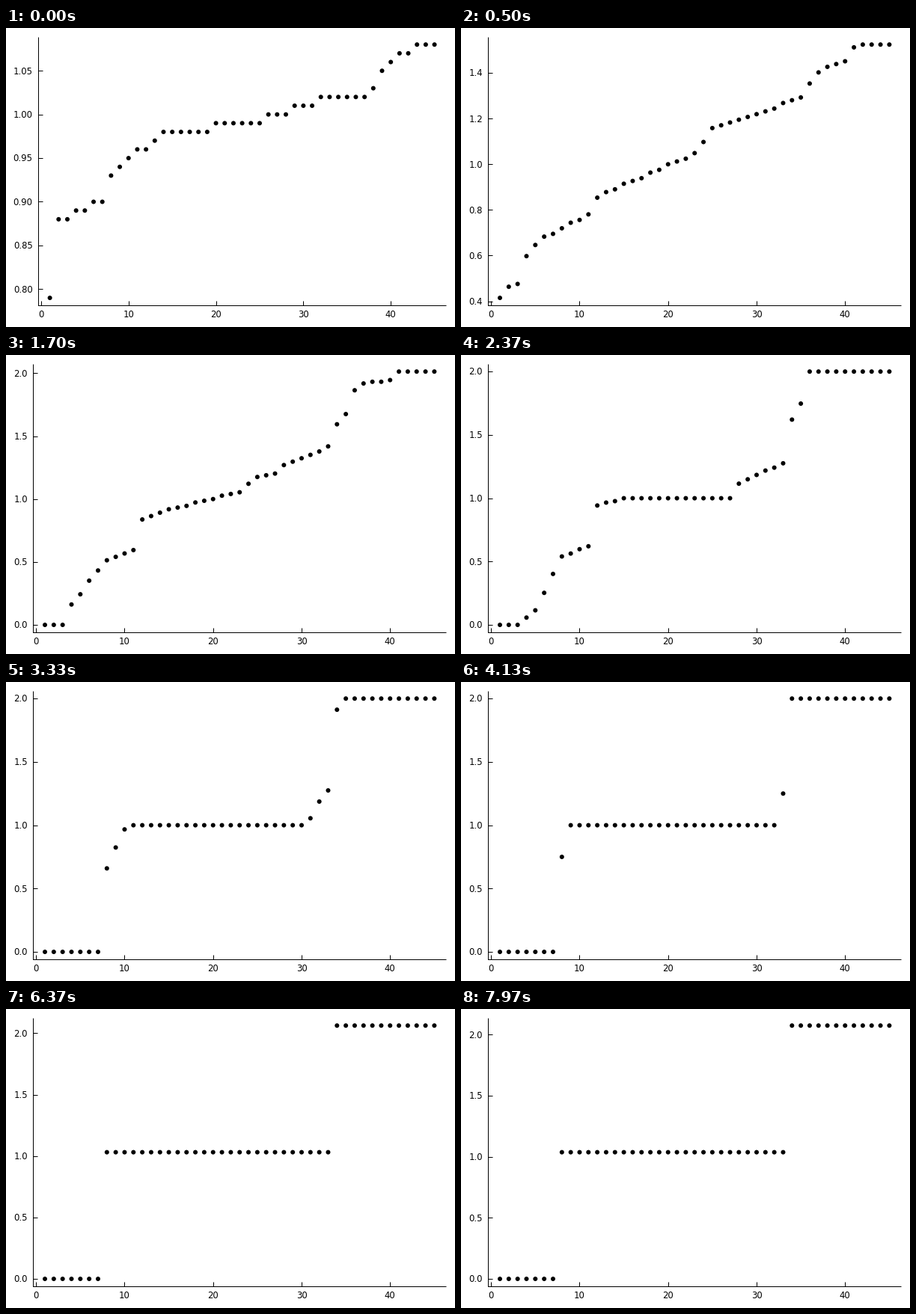
These frames come from a looping animation (600x400 px, 8 s). A matplotlib script:

```python
import numpy as np
import matplotlib.pyplot as plt
from matplotlib.animation import FuncAnimation

W, H, DPI = 600, 400, 100
FRAMES, FPS = 240, 30
N = 45
RIGHT, TOP, BOTTOM = 588, 12, 371.2
PAD = 0.03 / 1.06          # share of the axis left free at each end
PX = 72 / DPI
SPREAD_AT, LOCK_AT = 32, 71

rank = np.arange(1, N + 1)


def curve(*points):
    """Piecewise linear curve over the ranks through (rank, ratio) points."""
    return np.interp(rank, *zip(*points))


# Sorted frequency ratios: uncoupled, spread out, and partly locked.
free = curve((1, .79), (2, .88), (7, .90), (8, .93), (14, .98), (25, .99),
             (26, 1), (34, 1.02), (37, 1.02), (40, 1.06), (43, 1.08))
spread = curve((3, 0), (4, .274), (6, .45), (8, .484), (11, .58), (12, .726),
               (23, 1.113), (25, 1.34), (30, 1.45), (35, 1.61), (37, 1.84),
               (40, 1.9), (41, 2.03))
partial = curve((3, 0), (5, .115), (8, .54), (11, .62), (12, .943), (15, 1),
                (27, 1), (28, 1.115), (33, 1.28), (34, 1.62), (35, 1.75),
                (36, 2))

# Each oscillator settles on 0, 1 or 2; those next to a step do so last.
EDGES = np.array([7.5, 33.5])
goal = np.searchsorted(EDGES, rank)
gap = np.abs(rank[:, None] - EDGES).min(axis=1)
lock_time = np.array([15, 64, 21])[goal] / gap ** 0.8
power = np.where(partial > goal, 3, 1)


def shape(k):
    if k < SPREAD_AT:
        return free + (spread - free) * k / SPREAD_AT
    if k < LOCK_AT:
        f = (k - SPREAD_AT) / (LOCK_AT - SPREAD_AT)
        return spread + (partial - spread) * f
    u = np.clip((k - LOCK_AT) / lock_time, 0, 1)
    return goal + (partial - goal) * (1 - u ** power)


def values(k):
    """Whole cycle counts divided by a whole reference count."""
    ref = np.interp(k, [0, 32, 71, 99, 147, 191, 239],
                    [100, 62, 87, 91, 109, 129, 161])
    drift = np.interp(k, [99, 147, 191, 239], [1, 1.009, 1.031, 1.0373])
    return np.round(shape(k) * np.round(ref * drift)) / np.round(ref)


def tick_step(span):
    for limit, step in ((0.36, 0.05), (0.72, 0.1), (1.44, 0.2)):
        if span < limit:
            return step
    return 0.5


def scale(lo, hi, a, b):
    """Map lo..hi onto pixels a..b with the padding kept free."""
    edge = (b - a) * PAD
    return lambda v: a + edge + (v - lo) / (hi - lo) * (b - a - 2 * edge)


fig = plt.figure(figsize=(W / DPI, H / DPI), dpi=DPI, facecolor="white")
ax = fig.add_axes([0, 0, 1, 1])
ax.set_xlim(0, W)
ax.set_ylim(H, 0)
ax.axis("off")

lines, = ax.plot([], [], color="black", lw=PX, solid_capstyle="butt")
dots = ax.scatter(rank, rank, s=np.full(N, (6 * PX) ** 2), color="black",
                  linewidths=0)
font = dict(family="DejaVu Sans", size=11.6 * PX, color="black",
            va="baseline")
x_labels = [ax.text(0, 387, str(n), ha="center", **font)
            for n in range(0, 50, 10)]
y_labels = [ax.text(0, 0, "", ha="right", **font) for _ in range(10)]


def draw(k):
    v = values(k)
    lo, hi = v[0], v[-1]
    margin = 0.03 * (hi - lo)
    step = tick_step(hi - lo + 2 * margin)
    ticks = step * np.arange(np.ceil((lo - margin) / step),
                             np.floor((hi + margin) / step) + 1)
    digits = 2 if step == 0.05 else 1
    left = 29.6 + 6.8 * digits

    sx = scale(1, N, left, RIGHT)
    sy = scale(lo, hi, BOTTOM, TOP)
    dots.set_offsets(np.column_stack([sx(rank), sy(v)]))

    segs = [(left, TOP, left, BOTTOM), (left, BOTTOM, RIGHT, BOTTOM)]
    for n, label in enumerate(x_labels):
        x = sx(10 * n)
        segs.append((x, BOTTOM, x, BOTTOM - 6))
        label.set_x(x)
    for n, label in enumerate(y_labels):
        label.set_visible(n < len(ticks))
        if n < len(ticks):
            y = sy(ticks[n])
            segs.append((left, y, left + 6, y))
            label.set_position((left - 7.5, y + 4.3))
            label.set_text(f"{abs(ticks[n]):.{digits}f}")
    xs, ys = [], []
    for x0, y0, x1, y1 in segs:
        xs += [x0, x1, np.nan]
        ys += [y0, y1, np.nan]
    lines.set_data(xs, ys)
    return [lines, dots, *x_labels, *y_labels]


anim = FuncAnimation(fig, draw, frames=FRAMES, interval=1000 / FPS,
                     repeat=True, repeat_delay=0, blit=False)
plt.show()
```
